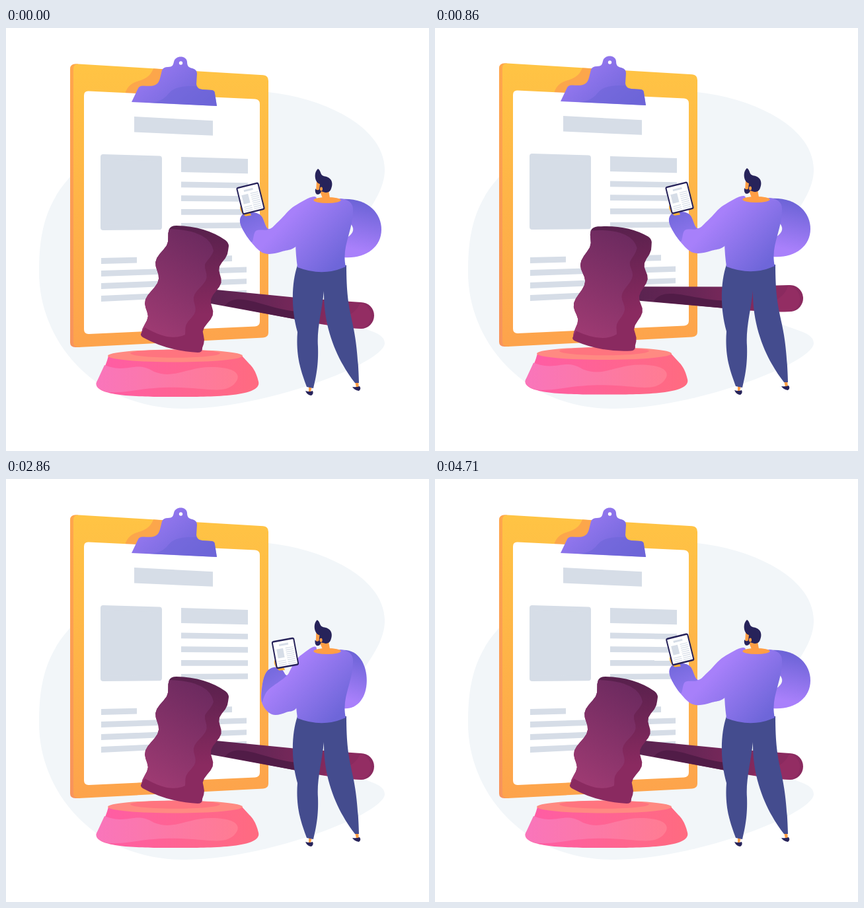
These frames come from a looping animation (640x640 px, 4780 ms). An HTML page:

```html
<!DOCTYPE html>
<html lang="en">
<head>
<meta charset="utf-8">
<title>Gavel and clipboard</title>
<style>
html, body { margin: 0; width: 100%; height: 100%; overflow: hidden; background: #fff; }
svg { display: block; width: 100vw; height: 100vh; }
.skin { fill: #ff9e45; }
.dark { fill: #27235a; }
.grey { fill: #d6dde7; }
.photo { stroke: #d6dde7; stroke-width: 8; stroke-linejoin: round; }
</style>
</head>
<body>
<svg viewBox="0 0 640 640">
<defs>
  <linearGradient id="board" x2="0" y2="1"><stop stop-color="#ffc444"/><stop offset="1" stop-color="#fda34c"/></linearGradient>
  <linearGradient id="side" x2="0" y2="1"><stop stop-color="#ffa64c"/><stop offset="1" stop-color="#f8935c"/></linearGradient>
  <linearGradient id="clip" x2="1" y2=".7"><stop stop-color="#a57ff9"/><stop offset="1" stop-color="#6d65d8"/></linearGradient>
  <linearGradient id="rim"><stop stop-color="#ff5ca6"/><stop offset="1" stop-color="#ff6b80"/></linearGradient>
  <linearGradient id="pink"><stop stop-color="#f975bb"/><stop offset="1" stop-color="#ff7c92"/></linearGradient>
  <linearGradient id="wood" x1=".7" x2=".3" y2="1"><stop stop-color="#6c2a5f"/><stop offset="1" stop-color="#9d3a72"/></linearGradient>
  <linearGradient id="edge" x2="0" y2="1"><stop stop-color="#57204c"/><stop offset=".7" stop-color="#8a2a60"/></linearGradient>
  <linearGradient id="grip"><stop stop-color="#5a2350"/><stop offset=".35" stop-color="#692656"/><stop offset=".8" stop-color="#8a2a5f"/></linearGradient>
  <linearGradient id="shirt" gradientUnits="userSpaceOnUse" x1="425" y1="290" x2="500" y2="360"><stop stop-color="#a780fa"/><stop offset="1" stop-color="#6e66d9"/></linearGradient>
  <linearGradient id="sleeve" x1=".6" x2=".4" y2="1"><stop stop-color="#6962d5"/><stop offset=".85" stop-color="#a980fb"/></linearGradient>
  <linearGradient id="cuff" x2=".4" y2="1"><stop stop-color="#7067da"/><stop offset="1" stop-color="#8f76ee"/></linearGradient>
  <clipPath id="insideArm"><use href="#leftArm"/></clipPath>
</defs>

<path fill="#f2f6f9" d="M397 97C480 106 572 148 573 214C574 272 488 330 488 398C488 462 573 448 573 477C573 506 395 576 270 576C130 576 50 470 50 370C50 265 75 165 397 97Z"/>

<g id="clipboard">
  <path fill="url(#side)" d="M109 54.5Q97 53 97 62V476Q97 483 105 483H112Z"/>
  <path fill="url(#board)" d="M110 54.6L389 71.3Q397 72 397 80V461Q397 468 389 468.5L110 483Q102 483 102 476V62Q102 54 110 54.6Z"/>
  <path fill="#fca64b" d="M180 100C188 72 212 88 223 61.4L262 64V104Z"/>
  <path fill="#fff" d="M125 95.5L377 107.5Q384 108 384 115V444Q384 451 377 451.5L125 463Q118 463 118 456V102Q118 95 125 95.5Z"/>
  <path fill="url(#clip)" d="M190 112L200 91Q202 87 208 87.5C226 89 230 86 233 76L236 64Q238 59 245 59C252 59 253 56 254 51C256 41 273 41 274 51C274 57 276 60 282 61Q289 63 289 69L288 85Q289 92 297 93L312 94Q316 95 316 99L319 118Z"/>
  <path fill="#6e66d9" opacity=".6" d="M217 113C258 109 232 86 288 88Q289 92 297 93L312 94Q316 95 316 99L319 118Z"/>
  <circle cx="264.5" cy="53" r="2.7" fill="#fff"/>
  <g id="text" class="grey"></g>
</g>

<g id="base">
  <path fill="url(#rim)" d="M155 496Q150 516 137 536C130 560 220 558 260 558C310 558 388 558 382 535C378 518 372 512 368 508L357 496Z"/>
  <path fill="url(#pink)" d="M149 510C186 524 194 502 224 520C254 532 274 513 310 513C350 513 358 526 345 539C322 560 285 533 190 549Q170 552 155 551Q134 546 137 536Z"/>
  <ellipse cx="256" cy="496" rx="102" ry="9.5" fill="#ff8a82"/>
  <path fill="#ff747f" d="M188 492C195 485 317 485 324 492C322 501 190 501 188 492Z"/>
</g>

<g id="gavel">
  <path fill="url(#grip)" d="M308 395L440 408L537 415A20 20 0 0 1 537 455Q490 452 440 441L310 417Z"/>
  <path fill="#511c47" d="M331 420C350 396 390 424 440 429L450 443Z"/>
  <path fill="#982f66" opacity=".65" d="M536 416A20 20 0 0 1 537 455Q500 453 480 448C492 436 524 444 536 416Z"/>
  <path id="block" fill="url(#edge)"/>
  <path id="face" fill="url(#wood)"/>
</g>

<g id="man">
  <path class="skin" d="M458 542H463L461 551H458ZM528 535H533L534 544H530Z"/>
  <path class="dark" d="M453 549Q459 551 464 549Q466 554 462 556Q456 556 453 549ZM524 543Q530 544 535 542Q538 546 534 549Q527 548 524 543Z"/>
  <path fill="#444c8e" d="M441 359H515C515 450 531 430 534 537H528C506 509 480 460 481 398C478 428 470 455 472 482C473 510 469 528 465 545L455 543C448 523 438 500 441 460C431 425 432 385 441 359Z"/>
  <g id="rightArm">
    <path fill="url(#sleeve)" d="M506 259C546 256 568 279 568 305C568 332 543 350 510 347L490 330L500 270Z"/>
    <path fill="#f4f7fa" d="M515 296L522 297C527 303 527 310 516 317Z"/>
  </g>
  <path class="skin" d="M480 246H488L491 262H479Z"/>
  <path fill="url(#shirt)" d="M466 258Q486 264 506 258C518 259 525 265 525 274C526 305 507 330 514 361Q480 377 441 362C438 340 436 315 442 285Z"/>
  <path id="leftArm" fill="url(#shirt)"/>
  <path id="forearm" fill="url(#cuff)" clip-path="url(#insideArm)"/>
  <ellipse class="skin" cx="486" cy="260.5" rx="20.5" ry="4.5"/>
  <g id="head">
    <path class="skin" d="M470 232L469 246L476 250L480 260H489L487 240Z"/>
    <path class="dark" d="M472 213C478 217 474 223 483 224.5C494 227 495 236 492 243C490 249 485 250 480 248L477 247Q475 253 470 251.5Q467 249 468 243Q471 247 474 244L475 236C467 234 465 219 472 213Z"/>
    <ellipse class="skin" cx="477" cy="243.5" rx="2" ry="3"/>
  </g>
  <g id="tablet">
    <path fill="#ffb136" d="M-13 5C-21 6 -21 16 -14 24L-5 25L-8 14Z"/>
    <rect class="dark" x="-17.5" y="-21.5" width="35" height="43" rx="3"/>
    <rect fill="#fff" x="-15.5" y="-19" width="31" height="38" rx="1"/>
    <path class="grey" d="M-7 -15H7V-12H-7ZM-12 -8H-2V6H-12Z"/>
    <path stroke="#d6dde7" stroke-width="12" stroke-dasharray="1.2 1.8" d="M7.5 -8V18M-6.500 10V18"/>
  </g>
</g>
</svg>

<script>
const LOOP = 4780, STEP = LOOP / 67;
const el = id => document.getElementById(id);
const mix = (a, b, p) => a + (b - a) * p;
const shape = (id, d) => el(id).setAttribute("d", d);
const move = (id, transform) => el(id).setAttribute("transform", transform);

// Bars on the sheet lean towards a horizon at y = 280
function bar(x, y, w, h, name = "") {
  const right = v => v + (280 - v) * .00036 * w;
  el("text").innerHTML +=
    `<path class="${name}" d="M${x} ${y}L${x + w} ${right(y)}V${right(y + h)}L${x} ${y + h}Z"/>`;
}
bar(194, 134, 119, 23.5);
bar(147, 195, 85, 107, "photo");
bar(265, 195, 101, 23);
bar(144, 348, 54, 9);
bar(265, 346, 77, 9);
for (let i = 0; i < 4; i++) bar(265, 232.5 + 20.8 * i, 101, 8.7);
for (let i = 0; i < 3; i++) {
  bar(144, 367 + 19 * i, 91, 9);
  bar(265, 364.5 + 18.3 * i, 99, 8.5);
}

// Wavy side of the gavel head between two points
function wave(x0, y0, x1, y1, size, period, crest) {
  const points = [];
  for (let p = 0; p <= 1.001; p += .04) {
    const y = mix(y0, y1, p), fade = Math.min(1, 6 * p, 6 - 6 * p);
    const bend = size * Math.cos(2 * Math.PI * (y - crest) / period) - 1.5;
    points.push(`${mix(x0, x1, p).toFixed(2) * 1 + fade * bend} ${y}`);
  }
  return points.join("L");
}
const leftSide = wave(247, 304, 205, 461, 6, 60, 382);
shape("block", `M${leftSide}Q202 465 207 468Q245 489 290 491Q297 491 297 485L${wave(297, 484, 337, 330, 4.5, 48, 434)}Q337 325 332 321Q302 300 258 299Q250 299 247 304Z`);
shape("face", `M${leftSide}L210 453Q244 473 266 466L${wave(271, 464, 314, 337, 5, 50, 430)}Q308 306 247 304Z`);

// Closed smooth curve through points
function curve(points) {
  const n = points.length, at = i => points[(i + n) % n];
  const handle = (i, sign) => at(i).map((v, k) => v + sign * (at(i + 1)[k] - at(i - 1)[k]) / 6);
  return `M${points[0]}` + points.map((_, i) => `C${handle(i, 1)} ${handle(i + 1, -1)} ${at(i + 1)}`).join("");
}

// Arm outline from shoulder over hand and elbow, stretched out and drawn in
const pairs = text => text.split(" ").map(pair => pair.split(",").map(Number));
const armOut = pairs("470,258 437,269 414,291 397,304 386,284 372,279 357,283 355,298 371,324 391,341 418,338 444,324");
const armIn = pairs("470,258 447,266 434,282 425,297 417,288 405,285 394,292 388,310 387,338 402,356 424,353 444,339");

function drawArm(p) {
  const points = armOut.map((a, i) => a.map((v, k) => mix(v, armIn[i][k], p)));
  const fold = [mix(378, 396, p), mix(307, 320, p)];
  shape("leftArm", curve(points));
  shape("forearm", curve([...points.slice(3, 9), fold]));
}

function draw(t) {
  const ramp = (from, to) =>
    (1 - Math.cos(Math.PI * Math.min(1, Math.max(0, (t - from) / (to - from))))) / 2;

  const lift = ramp(0, 410), fall = ramp(410, 800), recoil = ramp(880, 1360);
  const angle = 47 * lift - 52.5 * fall + 14.7 * recoil - 12.2 * ramp(1360, 1710) + 3 * ramp(1710, 1930);
  move("gavel", `translate(${10 * (lift - fall) + recoil - ramp(1360, 1710)} ${-33 * lift + 7 * fall + 26 * recoil}) rotate(${angle} 537 435)`);

  const hop = ramp(720, 860) - ramp(860, 1020);
  move("clipboard", `translate(0 ${-hop})`);
  move("man", `translate(0 ${-hop})`);
  move("base", `translate(0 ${-3.5 * hop})`);

  const nod = ramp(1220, 1930) - .9 * (ramp(2300, 2930) - ramp(2930, 3430)) - ramp(3430, 4260);
  move("head", `rotate(${-13 * nod} 483 256)`);

  const reach = ramp(1100, 1690) - ramp(3860, LOOP);
  const x = mix(370, 422.5, reach), y = mix(258, 263.5, reach) - 11 * reach * (1 - reach);
  move("tablet", `translate(${x} ${y}) rotate(${mix(-14, -10.5, reach)})`);
  move("rightArm", `translate(508 0) scale(${1 - .37 * reach * reach} 1) translate(-508 0)`);
  drawArm(reach);
}

const start = performance.now();
function tick() {
  const t = (performance.now() - start) % LOOP;
  draw(Math.floor((t + 6) / STEP) % 67 * STEP);
  requestAnimationFrame(tick);
}
tick();
</script>
</body>
</html>
```
